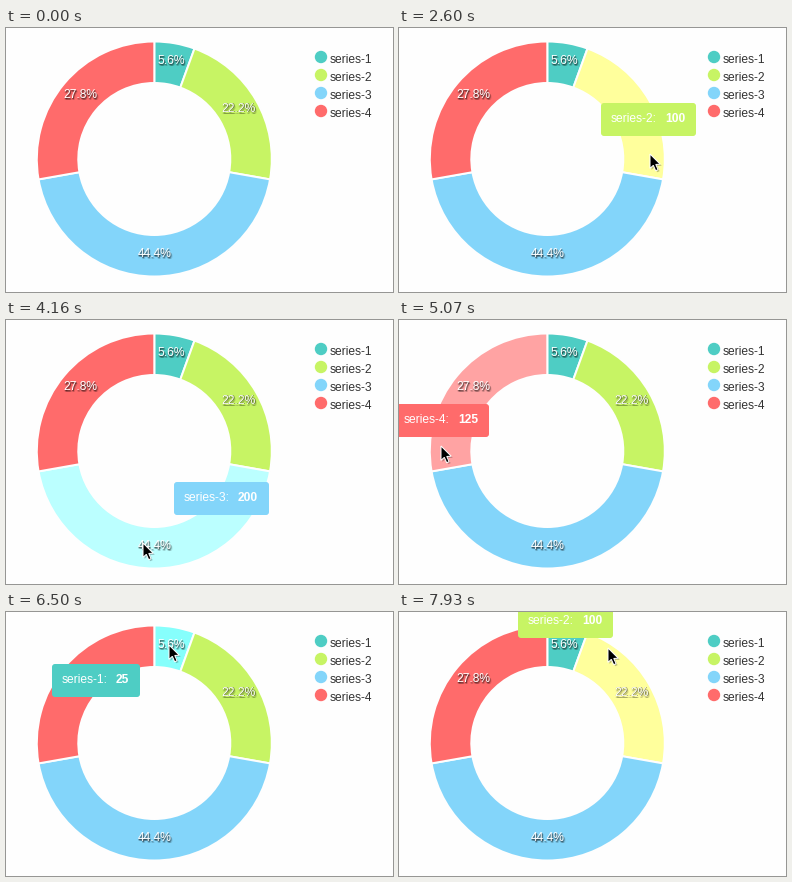
Write a matplotlib script that moves like this. It is 387 px wide and 264 px high and loops after 8000 ms.

```python
import numpy as np
import matplotlib.pyplot as plt
from matplotlib.animation import FuncAnimation
from matplotlib.patches import Circle, FancyBboxPatch, Polygon, Wedge

W, H, DPI = 387, 264, 72          # at 72 dpi one point is one pixel
LOOP, INTERVAL, STEP = 8000, 40, 130
CX, CY, R_OUT, R_IN = 148.3, 131, 117.5, 76

VALUES = [25, 100, 200, 125]
COLORS = [(78, 205, 196), (199, 244, 100), (131, 213, 250), (255, 107, 107)]
BOUNDS = np.concatenate([[0], np.cumsum(VALUES)]) / sum(VALUES) * 360

# time, x, y of the pointer tip
POINTER = np.array([
    (130, 388, 264), (1430, 251, 116), (1560, 251, 118), (1950, 251, 126),
    (2730, 251, 126), (3510, 217, 213), (3900, 217, 213), (4160, 137, 223),
    (4420, 135, 223), (4620, 70, 185), (4810, 42, 126), (5200, 42, 126),
    (5980, 60, 95), (6240, 95, 52), (6500, 163, 33), (6890, 163, 33),
    (7670, 167, 44), (7800, 172, 43), (7930, 209, 36),
])
# time, centre x, bottom y of the tooltip, which trails the pointer
TOOLTIP = np.array([
    (1560, 247, 90), (1950, 249.5, 108), (2730, 249.5, 108),
    (3640, 216, 195), (4160, 216, 195), (4420, 136, 205), (4620, 80, 170),
    (4810, 42.5, 117), (5070, 42.5, 117), (5330, 42.5, 108),
    (5850, 50, 100), (6240, 68, 90), (6500, 90.5, 85), (6760, 162, 15),
    (6890, 162, 15), (7670, 166.5, 26), (7930, 166.5, 26),
])
ARROW = 0.9 * np.array([(0, 0), (0, 16), (3.7, 12.6), (6.3, 18.6),
                        (9, 17.4), (6.4, 11.6), (11.4, 11.4)])


def rgb(color, lift=0):
    return tuple(min(c + lift, 255) / 255 for c in color)


def along(path, t):
    return [np.interp(t, path[:, 0], path[:, k]) for k in (1, 2)]


def hovered(x, y):
    """Index of the slice under a point, or None."""
    dx, dy = x - CX, y - CY
    if not R_IN < np.hypot(dx, dy) < R_OUT:
        return None
    angle = np.degrees(np.arctan2(dx, -dy)) % 360
    return int(np.searchsorted(BOUNDS, angle, side="right")) - 1


plt.rcParams["font.family"] = "Liberation Sans"
fig = plt.figure(figsize=(W / DPI, H / DPI), dpi=DPI, facecolor="#fefefe")
ax = fig.add_axes([0, 0, 1, 1])
ax.set(xlim=(0, W), ylim=(H, 0))
ax.axis("off")


def write(x, y, s, color="white", z=3, **kw):
    return ax.text(x, y, s, color=color, fontsize=12, zorder=z,
                   va="baseline", **kw)


slices, dots = [], []
for i, color in enumerate(COLORS):
    start, end = BOUNDS[i], BOUNDS[i + 1]
    wedge = Wedge((CX, CY), R_OUT, start - 90, end - 90, width=R_OUT - R_IN,
                  fc=rgb(color), ec="#fefefe", lw=2)
    slices.append(ax.add_patch(wedge))

    mid = np.radians((start + end) / 2)
    x, y = CX + 97 * np.sin(mid), CY - 97 * np.cos(mid) + 1
    share = f"{VALUES[i] / sum(VALUES):.1%}"
    for dx, dy, a in [(0, 1, .25), (1, 1, .35), (1, 2, .22), (0, 2, .12), (2, 2, .1)]:
        write(x + dx, y + dy, share, "black", 2, ha="center", alpha=a)
    write(x, y, share, ha="center")

    dots.append(ax.add_patch(Circle((315, 29 + 18 * i), 6.2, fc=rgb(color), lw=0)))
    write(324, 35 + 18 * i, f"series-{i + 1}", "#333333")

box = ax.add_patch(FancyBboxPatch((0, 0), 95, 33, lw=0, zorder=5,
                                  boxstyle="round,pad=0,rounding_size=3"))
name = write(0, 0, "", z=6)
value = write(0, 0, "", z=6, weight="bold")
shade = ax.add_patch(Polygon(ARROW, fc="black", lw=0, alpha=.25, zorder=8))
arrow = ax.add_patch(Polygon(ARROW, fc="black", ec="white", lw=1, zorder=9))

# the tooltip keeps the last slice that was hovered
last, current = [], 1
for k in range(LOOP // STEP + 1):
    hit = hovered(*along(POINTER, k * STEP))
    current = current if hit is None else hit
    last.append(current)


def place_tooltip(t, i):
    alpha = np.clip((t - 1500) / 450, 0, 1)
    width = 95 if VALUES[i] > 99 else 88
    x, bottom = along(TOOLTIP, t)
    left, top = round(x - width / 2), round(bottom) - 33
    box.set_bounds(left, top, width, 33)
    box.set_facecolor(rgb(COLORS[i]))
    name.set_text(f"series-{i + 1}:")
    name.set_position((left + 10, top + 19))
    value.set_text(str(VALUES[i]))
    value.set_position((left + 64, top + 19))
    for part in (box, name, value):
        part.set_alpha(alpha)


def draw(frame):
    step = (frame * INTERVAL + 30) // STEP
    t = step * STEP
    tip = np.round(along(POINTER, t))
    hit = hovered(*tip)
    for i, wedge in enumerate(slices):
        wedge.set_facecolor(rgb(COLORS[i], 56 if i == hit else 0))
    dots[1].set_facecolor("#d5ec88" if 1430 <= t < 1820 else rgb(COLORS[1]))
    place_tooltip(t, last[step])
    arrow.set_xy(ARROW + tip)
    shade.set_xy(ARROW + tip + (1.5, 1.5))
    arrow.set_visible(t > 0)
    shade.set_visible(t > 0)
    return []


anim = FuncAnimation(fig, draw, frames=LOOP // INTERVAL, interval=INTERVAL,
                     repeat=True)
plt.show()
```
